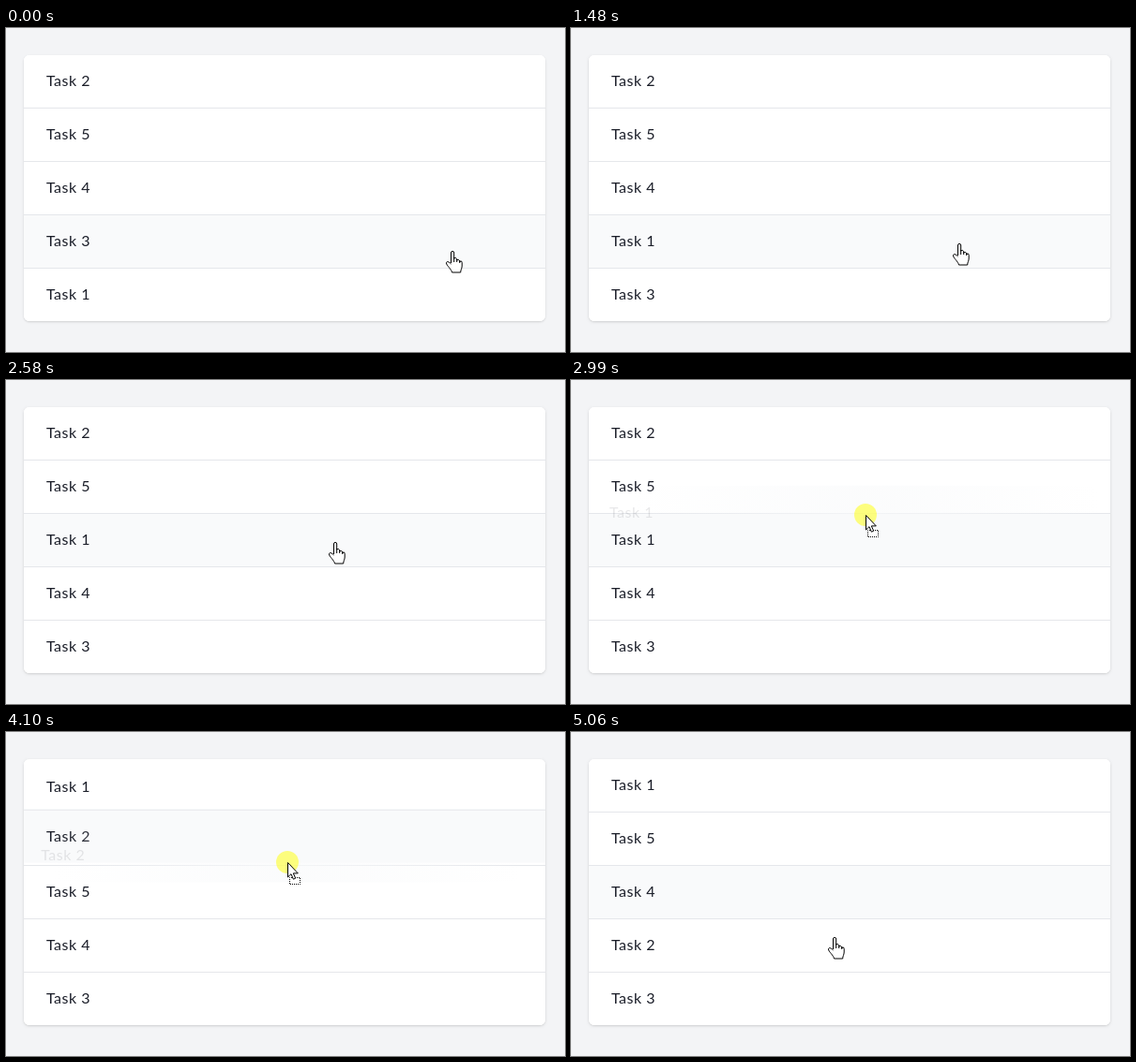
These frames come from a looping animation (596x346 px, 5.85 s). An HTML page with a canvas:

```html
<!DOCTYPE html>
<html lang="en">
<head>
<meta charset="utf-8">
<title>Sortable tasks</title>
<style>
html, body { margin: 0; width: 100%; height: 100%; overflow: hidden; background: #f3f4f6; }
canvas { display: block; }
</style>
</head>
<body>
<canvas id="stage" width="596" height="346"></canvas>
<script>
const ctx = document.getElementById('stage').getContext('2d');
const LOOP = 5850, LEFT = 19, TOP = 28, WIDTH = 556, PITCH = 57;
const TRAVEL_MS = 330, GRAB_MS = 40, SWAP_LAG = 75, SWAP_MS = 150;
const START = { x: 476, y: 239 };

// Each drag: arrive and press at "from", glide for "ms" to "to", let go at "drop"
const DRAGS = [
  { arrive: 620, press: 880, ms: 480, drop: 1480, from: { x: 422, y: 275 }, to: { x: 414, y: 231 } },
  { arrive: 1620, press: 1730, ms: 180, drop: 2300, from: { x: 392, y: 231 }, to: { x: 390, y: 175 } },
  { arrive: 2740, press: 2750, ms: 400, drop: 3280, from: { x: 316, y: 173 }, to: { x: 308, y: 115 } },
  { arrive: 3600, press: 3670, ms: 800, drop: 4860, from: { x: 306, y: 64 }, to: { x: 281, y: 220 } }
];

const HAND = new Path2D('M-1.5 12V1a1.600 1.600 0 0 1 3.200 0V7q1.500-1.500 3 .5V9q1.500-1.500 3 .5V10.500q2.500-1.500 2.500 1' +
  'V15c0 3-1.500 4-1.500 7H-.5C-1 18.500-6.500 14.500-6.500 12c0-2 2.500-2 5 1');
const KNUCKLES = new Path2D('M1.700 6V11M4.700 8V11M7.700 9V12');
const ARROW = new Path2D('M.5 .5V16L4 12.700 6.400 18.200 8.700 17.200 6.300 11.900H11.300Z');

const ease = k => k * k * (3 - 2 * k);
const easeInverse = v => .5 - Math.sin(Math.asin(1 - 2 * v) / 3);
const ramp = (t, start, end) => ease(Math.max(0, Math.min(1, (t - start) / (end - start))));
const mix = (a, b, kx, ky) => ({ x: a.x + (b.x - a.x) * kx, y: a.y + (b.y - a.y) * ky });
const rowAt = y => Math.floor((y - TOP) / PITCH);

// A swap follows each time a drag crosses the line between two rows
const SWAPS = DRAGS.flatMap(({ press, ms, from, to }) => {
  const first = rowAt(from.y), last = rowAt(to.y), step = Math.sign(last - first), swaps = [];
  for (let row = first; row !== last; row += step) {
    const upper = Math.min(row, row + step);
    const crossed = (TOP + (upper + 1) * PITCH - from.y) / (to.y - from.y);
    swaps.push({ upper, time: press + GRAB_MS + ms * easeInverse(crossed) + SWAP_LAG });
  }
  return swaps;
});

function pointerAt(t) {
  let p = START, free = 0;
  for (const { arrive, press, ms, drop, from, to } of DRAGS) {
    const go = ramp(t, Math.max(free + 30, arrive - TRAVEL_MS), arrive);
    const pull = ramp(t, press + GRAB_MS, press + GRAB_MS + ms);
    p = mix(mix(p, from, go, go), to, pull * pull, pull);
    free = drop;
  }
  return p;
}

function layoutAt(t) {
  const order = [2, 5, 4, 3, 1], rows = {};
  order.forEach((task, i) => rows[task] = i);
  for (const { time, upper } of SWAPS) {
    if (t < time) break;
    const k = ramp(t, time, time + SWAP_MS), [a, b] = order.slice(upper, upper + 2);
    rows[a] += k;
    rows[b] -= k;
    order.splice(upper, 2, b, a);
  }
  return { order, rows };
}

function label(task, x, y) {
  ctx.fillStyle = '#1a1d28';
  ctx.fillText('Task ' + task, x, y + 34);
}

function drawCard() {
  ctx.beginPath();
  ctx.roundRect(LEFT, TOP + 1, WIDTH, 284, 6);
  ctx.fillStyle = '#fff';
  ctx.shadowOffsetY = 1;
  for (const [blur, alpha] of [[3, .1], [2, .06]]) {
    ctx.shadowBlur = blur;
    ctx.shadowColor = `rgba(0,0,0,${alpha})`;
    ctx.fill();
  }
  ctx.shadowColor = 'transparent';
}

function drawRows({ order, rows }, hovered) {
  ctx.save();
  ctx.clip();
  order.forEach((task, i) => {
    const y = TOP + rows[task] * PITCH;
    ctx.fillStyle = task === hovered ? '#f9fafb' : '#fff';
    ctx.fillRect(LEFT, y, WIDTH, PITCH);
    ctx.fillStyle = '#e5e7eb';
    if (i) ctx.fillRect(LEFT, y, WIDTH, 1);
    label(task, LEFT + 24, y);
  });
  ctx.restore();
}

function drawGhost(task, grab, p) {
  const x = LEFT + p.x - grab.x, y = TOP + rowAt(grab.y) * PITCH + p.y - grab.y;
  const glow = ctx.createRadialGradient(p.x, p.y, 0, p.x, p.y, 250);
  glow.addColorStop(0, 'rgba(249,250,251,.7)');
  glow.addColorStop(1, 'rgba(249,250,251,0)');
  ctx.fillStyle = glow;
  ctx.fillRect(x, y, WIDTH, PITCH);
  ctx.globalAlpha = .1;
  label(task, x + 24, y);
  ctx.globalAlpha = 1;
}

function drawPointer({ x, y }, pressed, dragging) {
  ctx.save();
  ctx.translate(Math.round(x), Math.round(y));
  if (pressed) {
    ctx.fillStyle = 'rgba(255,255,0,.5)';
    ctx.beginPath();
    ctx.arc(0, 0, 12, 0, 7);
    ctx.fill();
  }
  ctx.fillStyle = '#fff';
  ctx.strokeStyle = '#000';
  if (dragging) {
    ctx.fillRect(2, 16, 12, 8);
    ctx.setLineDash([1, 1]);
    ctx.lineDashOffset = .5;
    ctx.strokeRect(2.5, 16.5, 11, 7);
    ctx.setLineDash([]);
  }
  const shape = dragging ? ARROW : HAND;
  ctx.fill(shape);
  ctx.stroke(shape);
  if (!dragging) ctx.stroke(KNUCKLES);
  ctx.restore();
}

function draw(t) {
  const pointer = pointerAt(t), layout = layoutAt(t);
  const drag = DRAGS.find(({ press, drop }) => t >= press && t < drop);
  const dragging = drag && t >= drag.press + GRAB_MS;
  // After the last drop the highlight stays on the row above
  const stuck = t >= DRAGS.at(-1).drop ? 1 : 0;
  const hovered = drag
    ? layoutAt(drag.press).order[rowAt(drag.from.y)]
    : layout.order[rowAt(pointer.y) - stuck];

  ctx.fillStyle = '#f3f4f6';
  ctx.fillRect(0, 0, 596, 346);
  ctx.font = '16px Lato, sans-serif';
  ctx.letterSpacing = '0.5px';
  drawCard();
  drawRows(layout, hovered);
  if (dragging) drawGhost(hovered, drag.from, pointer);
  drawPointer(pointer, drag, dragging);
}

const began = performance.now();
function tick() {
  draw((performance.now() - began) % LOOP);
  requestAnimationFrame(tick);
}
tick();
</script>
</body>
</html>
```
